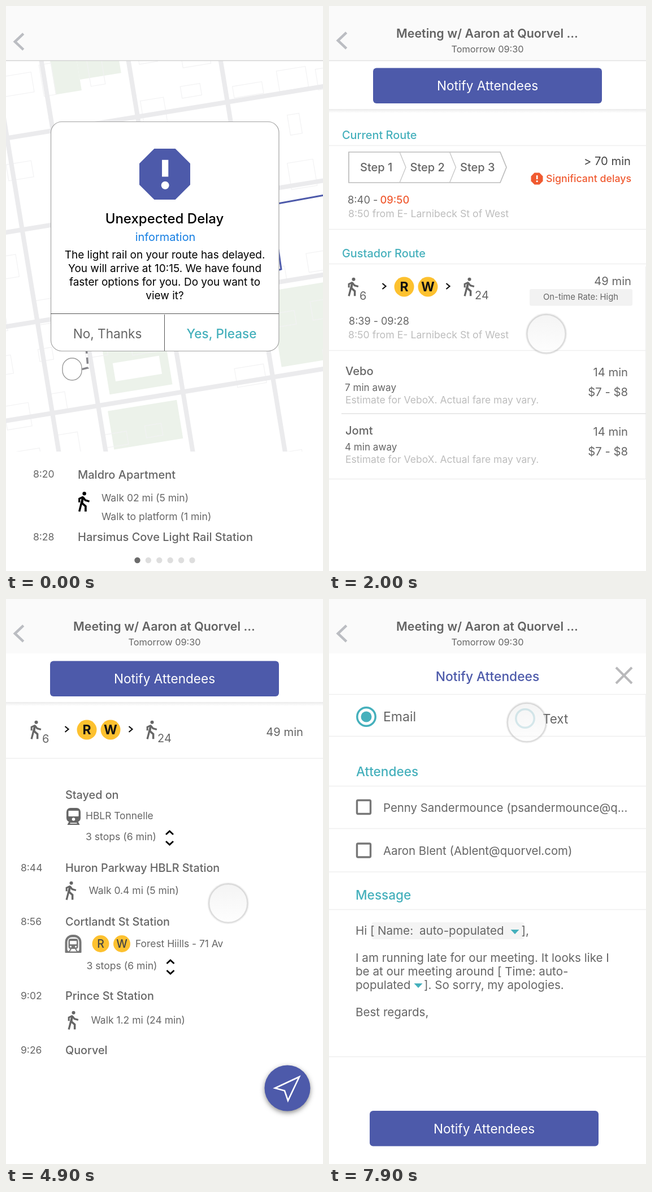
Animation of 561x998 px, one loop 8 s. Source, as an HTML page with a canvas:

```html
<!DOCTYPE html>
<html lang="en">
<head>
<meta charset="utf-8">
<title>Route delay</title>
<style>
html, body { margin: 0; width: 100%; height: 100%; overflow: hidden; background: #fff; }
canvas { display: block; width: 561px; height: 998px; }
</style>
</head>
<body>
<canvas id="stage" width="561" height="998"></canvas>
<script>
const ctx = document.getElementById('stage').getContext('2d');
const LOOP = 8000, TICK = 100;
const INDIGO = '#4d5aaa', TEAL = '#45b0bc', GRAY = '#666', PALE = '#bdbdbd';
const ORANGE = '#f05a30', YELLOW = '#fdc12f', RULE = '#efefef';

// timing
const ramp = (t, a, b) => Math.min(1, Math.max(0, (t - a) / (b - a)));
const easeOut = p => 1 - (1 - p) ** 3;
const easeInOut = p => p < .5 ? 4 * p ** 3 : 1 - 4 * (1 - p) ** 3;
const curve = (a, c, b, u) => a.map((v, i) => v * (1 - u) ** 2 + 2 * c[i] * u * (1 - u) + b[i] * u * u);

function seeded(seed) {
  return () => (seed = (seed * 16807) % 2147483647) / 2147483647;
}

// drawing helpers
function text(s, x, y, size, color = GRAY, weight = 400, align = 'left') {
  ctx.font = `${weight} ${size}px Inter, sans-serif`;
  ctx.textAlign = align;
  ctx.fillStyle = color;
  ctx.fillText(s, x, y);
}
function line(points, color, width = 1, close = false) {
  ctx.beginPath();
  points.forEach(([x, y]) => ctx.lineTo(x, y));
  if (close) ctx.closePath();
  ctx.strokeStyle = color;
  ctx.lineWidth = width;
  ctx.stroke();
}
function poly(points, color) {
  ctx.beginPath();
  points.forEach(([x, y]) => ctx.lineTo(x, y));
  ctx.fillStyle = color;
  ctx.fill();
}
function box(x, y, w, h, r, fill, stroke, width = 1) {
  ctx.beginPath();
  ctx.roundRect(x, y, w, h, r);
  if (fill) { ctx.fillStyle = fill; ctx.fill(); }
  if (stroke) { ctx.strokeStyle = stroke; ctx.lineWidth = width; ctx.stroke(); }
}
function disc(x, y, r, fill, stroke, width = 1) {
  box(x - r, y - r, 2 * r, 2 * r, r, fill, stroke, width);
}
const rule = y => line([[0, y + .5], [561, y + .5]], RULE, 1.4);

// chevron with its tip at x, y, pointing along dx, dy
function chevron(x, y, dx, dy, spread, color, width) {
  line([-1, 0, 1].map(k => k
    ? [x - dx + (dx ? 0 : k * spread), y - dy + (dy ? 0 : k * spread)]
    : [x, y]), color, width);
}
function octagon(x, y, r, color) {
  const corner = r / Math.cos(Math.PI / 8);
  poly(Array.from({ length: 8 }, (_, i) => {
    const a = (i + .5) * Math.PI / 4;
    return [x + corner * Math.cos(a), y + corner * Math.sin(a)];
  }), color);
}
function alertSign(x, y, r, color) {
  octagon(x, y, r, color);
  box(x - r * .11, y - r * .56, r * .25, r * .66, 0, '#fff');
  disc(x + r * .015, y + r * .44, r * .155, '#fff');
}
function walker(x, y, scale = 1.52, color = GRAY) {
  ctx.save();
  ctx.translate(x, y);
  ctx.scale(scale, scale);
  disc(1, -8.75, 2, color);
  line([[-.6, -5], [-1.5, 1.6], [2.4, 5], [2.4, 10.75]], color, 2.3);
  line([[-.9, -3.5], [-4.5, 10.75]], color, 2.2);
  line([[-.2, -5.2], [-4.5, -3.2], [-4.5, .8]], color, 2);
  line([[-.6, -5], [2, -1.6], [6.5, -.3]], color, 2.1);
  ctx.restore();
}
function bullet(letter, x, y, r, size, color, weight) {
  disc(x, y, r, YELLOW);
  text(letter, x, y + size * .365, size, color, weight, 'center');
}
function caret(x, y) {
  poly([[x - 7.5, y - 4], [x + 7.5, y - 4], [x, y + 4]], TEAL);
}
function stepper(x, y) {
  for (const d of [-1, 1]) chevron(x, y + 12 * d, 0, 6 * d, 6.5, '#000', 2.8);
}
function button(x, y) {
  box(x, y, 405, 62.5, 6, INDIGO);
  text('Notify Attendees', x + 202.5, y + 39.5, 22.6, '#fff', 400, 'center');
}
function transitRow(x, y) {
  walker(x, y);
  text('6', x + 12, y + 23, 20);
  for (const dx of [58.5, 171.5]) chevron(x + dx, y - 1, 6, 0, 5, '#111', 2.2);
  bullet('R', x + 91, y, 17.5, 23, '#111', 700);
  bullet('W', x + 133, y, 17.5, 23, '#111', 700);
  walker(x + 205, y);
  text('24', x + 216, y + 22, 20);
}
const backArrow = y => chevron(15.8, y, -15, 0, 14.2, '#bbbdc2', 4.5);

// screens
function map() {
  const rect = (x, y, w, h, color) => box(x, y, w, h, 0, color);
  const park = '#ecf2ea', street = '#ebebed', random = seeded(29);
  ctx.save();
  ctx.beginPath();
  ctx.rect(0, 97, 561, 690);
  ctx.clip();

  // the street grid is sheared in both directions
  ctx.save();
  ctx.transform(1, -.163, .165, 1, 0, 97);
  rect(76, -20, 46, 92, park);
  rect(122, -20, 73, 73, park);
  rect(388, 470, 173, 134, park);
  rect(84, 515, 111, 88, park);
  rect(76, 631, 122, 68, park);
  rect(98, 550, 82, 32, '#fff');
  for (let u = -110; u < 560; u += 80)
    for (let v = 10; v < 800; v += 81)
      if (random() < .6)
        box(u + random() * 22, v + random() * 18, 20 + random() * 32, 20 + random() * 36, 0, null, '#f2f2f3', 1.2);
  for (let v = 133; v < 800; v += 162) rect(-150, v - 4, 760, 8, street);
  for (const u of [-20, 61, 211, 370]) rect(u - 4, -20, 8, 840, street);
  ctx.restore();

  line([[470, 351], [561, 334.5]], INDIGO, 3);
  line([[482, 430], [487, 465], [480, 467]], INDIGO, 3);
  ctx.setLineDash([11, 7]);
  line([[142, 603], [145, 639], [133, 642]], '#85858a', 3.5);
  ctx.setLineDash([]);
  box(100, 622, 34, 39, 17, '#fff', '#999', 1.4);
  ctx.restore();
}

function modal() {
  box(79.5, 204.5, 403.5, 405, 19, '#fff', '#a2a2a2', 1.2);
  alertSign(281, 297, 45, INDIGO);
  text('Unexpected Delay', 280.5, 384, 24, '#000', 500, 'center');
  text('information', 282, 415, 19.9, '#157ee2', 400, 'center');
  ['The light rail on your route has delayed.', 'You will arrive at 10:15. We have found',
    'faster options for you. Do you want to', 'view it?']
    .forEach((s, i) => text(s, 281, 446 + 24 * i, 19, '#000', 400, 'center'));
  line([[79, 543.5], [483, 543.5]], '#555');
  line([[280.5, 545], [280.5, 609]], '#555');
  text('No, Thanks', 179.5, 587, 22.6, GRAY, 400, 'center');
  text('Yes, Please', 381.5, 587, 22.6, TEAL, 500, 'center');
}

function alertScreen() {
  map();
  text('8:20', 48, 833, 17.5);
  text('Maldro Apartment', 127, 835, 20, GRAY, 500);
  walker(137, 875.5, 1.62, '#000');
  text('Walk 02 mi (5 min)', 169, 875, 17.5);
  text('Walk to platform (1 min)', 169, 908, 17.5);
  text('8:28', 48, 944, 17.5);
  text('Harsimus Cove Light Rail Station', 127, 945, 20, GRAY, 500);
  for (let i = 0; i < 6; i++) disc(232.5 + 19.4 * i, 979, 5.2, i ? '#dedede' : '#6b6b6b');
  modal();
  backArrow(63);
}

function title() {
  backArrow(61);
  text('Meeting w/ Aaron at Quorvel ...', 280, 56, 21.4, '#636363', 600, 'center');
  text('Tomorrow 09:30', 280.5, 82, 16.3, GRAY, 400, 'center');
}

function actionBar() {
  button(78, 109.5);
  const shade = ctx.createLinearGradient(0, 182, 0, 189);
  shade.addColorStop(0, '#ebebeb');
  shade.addColorStop(1, '#fff');
  ctx.fillStyle = shade;
  ctx.fillRect(0, 182, 561, 7);
}

function routeHeading(name, y) {
  text(name, 23, y, 19.9, TEAL, 500);
  rule(y + 11);
}
function departure(y) {
  text('8:50 from E- Larnibeck St of West', 34, y, 17.7, PALE);
  rule(y + 21);
}
function ride(name, y, wait) {
  text(name, 29, y, 20.2, GRAY, 500);
  text(wait + ' min away', 28, y + 28, 17.1);
  text('Estimate for VeboX. Actual fare may vary.', 29, y + 50, 17.5, PALE);
  text('14 min', 529, y + 1.5, 20.2, GRAY, 400, 'right');
  text('$7 - $8', 529, y + 37, 20.3, GRAY, 400, 'right');
}

function routesScreen() {
  routeHeading('Current Route', 235);
  line([[35, 258], [303, 258], [314, 285], [303, 312], [35, 312]], '#bcbcbc', 1.7, true);
  for (let i = 0; i < 3; i++) {
    const x = 55 + 88.5 * i;
    text('Step ' + (i + 1), x, 292, 20, GRAY, 500);
    if (i < 2) chevron(x + 81, 285, 11, 0, 27, '#c4c4c4', 1.3);
  }
  text('> 70 min', 534, 281, 20.2, '#444', 400, 'right');
  alertSign(368, 305, 10.5, ORANGE);
  text('Significant delays', 535, 311, 17.8, ORANGE, 500, 'right');
  text('8:40 - ', 33, 349, 18.3);
  text('09:50', 90.5, 349, 18.3, ORANGE, 500);
  departure(373);

  routeHeading('Gustador Route', 444);
  line([[560.5, 460], [560.5, 835]], RULE);
  transitRow(42, 496);
  text('49 min', 535, 493, 20.2, GRAY, 400, 'right');
  box(355, 500, 182, 29.5, 3, '#f2f2f2');
  text('On-time Rate: High', 445.5, 519, 14.8, GRAY, 400, 'center');
  text('8:39 - 09:28', 35, 563, 18);
  departure(587);

  ride('Vebo', 652, 7);
  ride('Jomt', 757, 4);
  line([[22, 720], [561, 720]], '#e2e2e2', 1.5);
  rule(835);
}

function tram(x, y) {
  box(x - 12.5, y - 15, 25, 25, 7, GRAY);
  box(x - 9, y - 10, 18, 10, 1, '#fff');
  disc(x, y + 5, 2.8, '#fff');
  poly([[x - 8, y + 9], [x + 8, y + 9], [x + 11, y + 15], [x - 11, y + 15]], GRAY);
  line([[x - 6, y + 12], [x + 6, y + 12]], '#fff', 1.5);
}
function subway(x, y) {
  box(x - 14.5, y - 16, 29, 32, [13, 13, 1, 1], '#777');
  box(x - 10.5, y - 11.5, 21, 25, [8, 8, 4, 4], '#fff');
  box(x - 8.5, y - 9, 17, 18, 4, '#777');
  box(x - 6, y - 5, 12, 6, 1, '#fff');
  for (const d of [-1, 1]) {
    disc(x + 4.5 * d, y + 5, 1.6, '#fff');
    line([[x + 4 * d, y + 9], [x + 8 * d, y + 15]], '#777', 2);
  }
}
function fab(x, y) {
  ctx.save();
  ctx.shadowColor = 'rgba(0,0,0,.45)';
  ctx.shadowBlur = 9;
  ctx.shadowOffsetY = 3;
  disc(x, y, 40.5, INDIGO);
  ctx.restore();
  line([[x + 21, y - 20], [x - 22, y], [x - 5, y + 4.5], [x + 1, y + 22]], '#fff', 2.6, true);
}
function stop(name, y, time = '') {
  text(name, 105, y, 19.8, GRAY, 500);
  text(time, 26, y - 1, 17.5);
}
function walkLeg(label, x, y) {
  walker(x, y);
  text(label, x + 32.5, y + 6, 17.5);
}
function stopCount(x, y) {
  text('3 stops (6 min)', x, y, 17.6);
  stepper(x + 148.5, y - 4);
}

function stepsScreen() {
  transitRow(52, 231);
  text('49 min', 526, 242, 20.2, GRAY, 400, 'right');
  rule(281);
  stop('Stayed on', 353);
  tram(119.5, 384);
  text('HBLR Tonnelle', 141, 389, 17.4);
  stopCount(141, 426);
  stop('Huron Parkway HBLR Station', 482, '8:44');
  walkLeg('Walk 0.4 mi (5 min)', 114, 515);
  stop('Cortlandt St Station', 577, '8:56');
  subway(119, 609);
  bullet('R', 167.5, 609, 15, 19.5, '#444', 500);
  bullet('W', 205, 609, 15, 19.5, '#444', 500);
  text('Forest Hiills - 71 Av', 229, 615, 17.4);
  stopCount(142.5, 654);
  stop('Prince St Station', 708, '9:02');
  walkLeg('Walk 1.2 mi (24 min)', 118, 744);
  stop('Quorvel', 804, '9:26');
  fab(498, 864);
}

function sectionHeading(name, x, y) {
  text(name, x, y, 22.6, TEAL, 500);
  rule(y + 17);
}
function attendee(label, y) {
  box(49.5, y - 12, 24, 24, 2, null, '#777', 3.4);
  text(label, 96, y + 8, 20.4);
  rule(y + 37.5);
}

function notifyScreen() {
  const write = (s, x, y) => text(s, x, y, 20.6);
  text('Notify Attendees', 280.5, 145, 22.8, INDIGO, 500, 'center');
  for (const d of [-1, 1]) line([[522 - 14 * d, 121], [522 + 14 * d, 149]], '#b9b9bb', 4);
  rule(168);
  disc(66, 208, 16.2, '#fff', TEAL, 3.5);
  disc(66, 208, 9.5, TEAL);
  text('Email', 96, 216, 23);
  disc(347, 211, 16.2, '#fff', '#bfdfe5', 3.5);
  text('Text', 378, 220, 22.4);
  rule(242);
  line([[560.5, 168], [560.5, 243]], RULE);

  sectionHeading('Attendees', 48, 313);
  attendee('Penny Sandermounce (psandermounce@q...', 367.5);
  attendee('Aaron Blent (Ablent@quorvel.com)', 444);

  sectionHeading('Message', 47, 531);
  box(76, 571, 269, 30, 3, '#f4f4f4');
  write('Hi [', 47, 592.5);
  write('Name:', 86, 592.5);
  write('auto-populated', 160, 592.5);
  caret(329, 588);
  write('],', 340.5, 592.5);
  write('I am running late for our meeting. It looks like I', 47, 640.5);
  write('be at our meeting around [ Time: auto-', 47, 664.5);
  write('populated', 47, 688.5);
  caret(158, 683);
  write(']. So sorry, my apologies.', 168, 688.5);
  write('Best regards,', 47, 736.5);
  rule(808);
  button(72, 904);
}

// touch pointer
function pointerAt(t) {
  const start = [514, 847], yes = [384.5, 579], notify = [352.5, 134.5];
  if (t < 3000) return curve(start, [550, 690], yes, easeInOut(ramp(t, 300, 1150)));
  if (t < 7600) return curve(yes, [438, 356], notify, easeInOut(ramp(t, 4500, 5900)));
  const p = ramp(t, 7600, 7900) ** 2;
  return [notify[0] - 2.5 * p, notify[1] + 83.5 * p];
}
function pressAt(t) {
  return [1100, 3200, 6300].reduce((sum, a) => sum + Math.sin(Math.PI * ramp(t, a, a + 400)), 0);
}
function pointer(t) {
  const [x, y] = pointerAt(t), r = 34.3 - 2.6 * pressAt(t);
  const fill = ctx.createLinearGradient(0, y - r, 0, y + r);
  fill.addColorStop(0, 'rgba(230,230,230,.42)');
  fill.addColorStop(1, 'rgba(252,252,252,.42)');
  disc(x, y, r, fill);
  disc(x, y, r + .4, null, 'rgba(120,120,120,.09)', 4.4);
  disc(x, y, r, null, 'rgba(150,150,150,.26)', 2);
}

function layer(alpha, draw) {
  if (alpha <= 0) return;
  ctx.globalAlpha = alpha;
  draw();
  ctx.globalAlpha = 1;
}

function draw(t) {
  const opened = ramp(t, 1200, 1400);
  const routes = easeOut(ramp(t, 1600, 2000)), routesOut = 1 - ramp(t, 3400, 3600);
  const steps = easeOut(ramp(t, 3600, 4000)), stepsOut = 1 - ramp(t, 6500, 6700);
  ctx.fillStyle = '#fff';
  ctx.fillRect(0, 0, 561, 998);
  ctx.fillStyle = '#fafafa';
  ctx.fillRect(0, 0, 561, 96);
  layer(1 - opened, alertScreen);
  layer(routesOut, () => line([[0, 96.5], [561, 96.5]], opened < 1 ? '#d2d2d2' : '#e2e2e2', 1.4));
  layer(opened, title);
  layer(routes * stepsOut, actionBar);
  layer(routes * routesOut, routesScreen);
  layer(steps * stepsOut, stepsScreen);
  layer(easeOut(ramp(t, 6700, 7100)), notifyScreen);
  layer(ramp(t, 0, 200), () => pointer(t));
}

const origin = performance.now();
function frame() {
  const t = (performance.now() - origin) % LOOP;
  draw(Math.floor(t / TICK) * TICK);
  requestAnimationFrame(frame);
}
frame();
</script>
</body>
</html>
```
